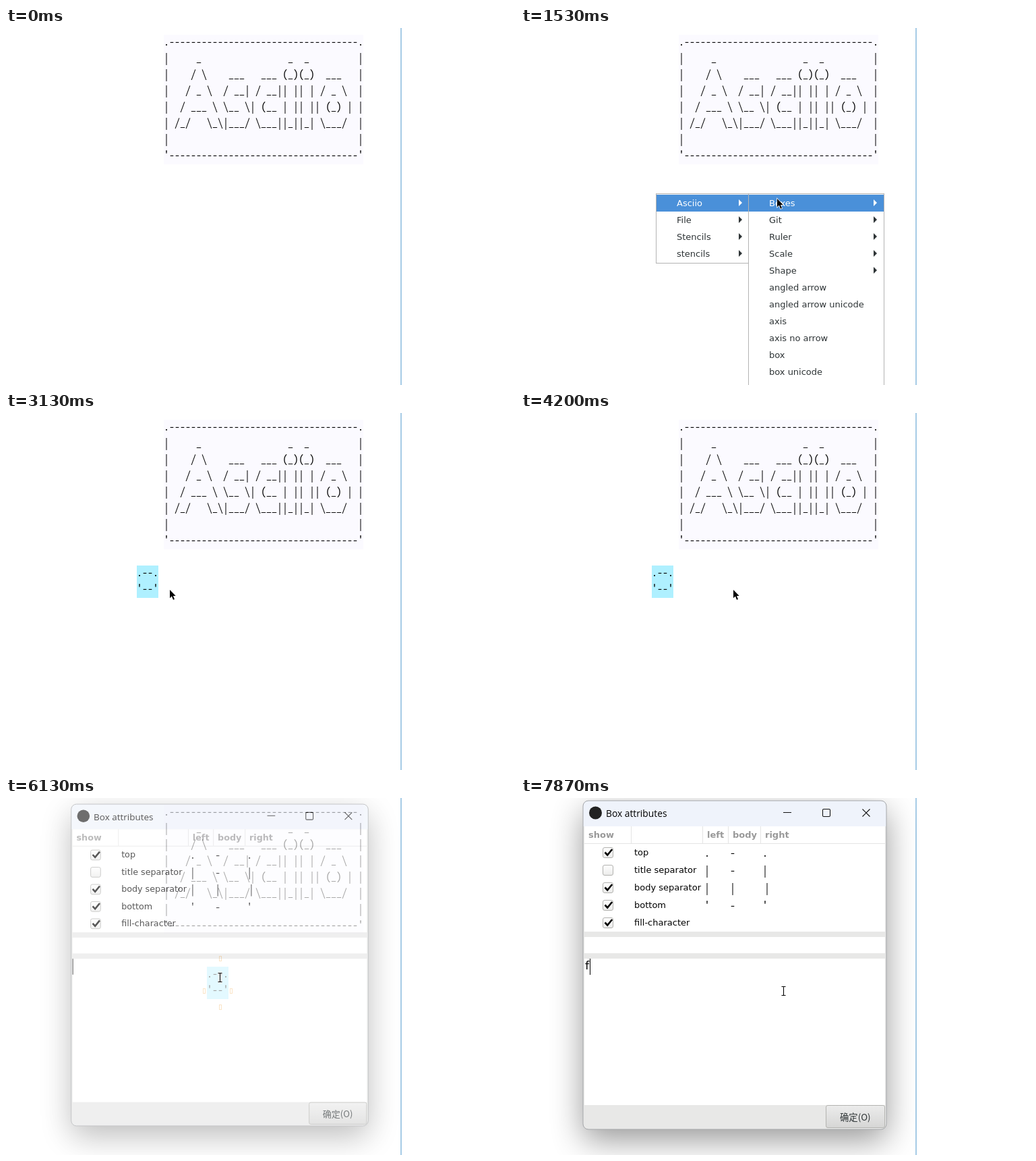
These frames come from a looping animation (755 px wide and 529 px high, 8 s). An HTML page:

```html
<!DOCTYPE html>
<html lang="en">
<head>
<meta charset="utf-8">
<title>Asciio box demo</title>
<style>
html, body { margin: 0; width: 100%; height: 100%; overflow: hidden; background: #fff; }
svg { display: block; width: 755px; height: 529px; }
text { white-space: pre; }
.ui { font: 13px "DejaVu Sans", sans-serif; }
.head { font: bold 13px "DejaVu Sans", sans-serif; fill: #999; }
.title { font: 13.8px "Open Sans", "Noto Sans", sans-serif; }
.cjk { font: 13.33px "Noto Sans CJK SC", "Noto Sans CJK JP", "Noto Sans CJK", sans-serif; fill: #2e3436; }
.mono { font: 16px "Noto Sans Mono CJK SC", "Noto Sans Mono CJK JP", "Noto Sans Mono", monospace; text-anchor: middle; }
.shadow { filter: blur(24px); }
</style>
</head>
<body>
<svg id="stage" viewBox="0 0 755 529">
  <defs>
    <linearGradient id="button" x2="0" y2="1"><stop stop-color="#ececec"/><stop offset="1" stop-color="#d6d6d5"/></linearGradient>
    <linearGradient id="check" x2="0" y2="1"><stop stop-color="#fff"/><stop offset="1" stop-color="#ebebea"/></linearGradient>
    <clipPath id="frame"><rect x="92" y="4" width="450" height="487" rx="8"/></clipPath>
  </defs>
</svg>
<script>
const stage = document.getElementById('stage');
const LOOP = 8000;

function add(parent, tag, attrs, content) {
  const el = document.createElementNS('http://www.w3.org/2000/svg', tag);
  for (const key in attrs) el.setAttribute(key, attrs[key]);
  if (content !== undefined) el.textContent = content;
  parent.appendChild(el);
  return el;
}
const group = parent => add(parent, 'g', {});
const rect = (p, x, y, width, height, fill, more) => add(p, 'rect', { x, y, width, height, fill, ...more });
const label = (p, x, y, cls, str) => add(p, 'text', { x, y, class: cls }, str);
const line = (p, d, stroke, width = 1) => add(p, 'path', { d, stroke, fill: 'none', 'stroke-width': width });
const show = (el, on) => el.setAttribute('visibility', on ? 'visible' : 'hidden');
const move = (el, x, y) => el.setAttribute('transform', `translate(${x} ${y})`);

// Text on a grid of 8 x 24 cells
function grid(p, x, y, rows) {
  rows.forEach((row, r) => [...row].forEach((ch, c) => {
    if (ch !== ' ') label(p, x + c * 8 + 4, y + r * 24 + 16, 'mono', ch);
  }));
}

// Canvas with banner
rect(stage, 585, 0, 2, 529, '#a6cbe6');
rect(stage, 234, 10, 296, 192, '#fbfaff');
const dashes = '-'.repeat(35);
grid(stage, 234, 10, [
  `.${dashes}.`,
  String.raw`|     _                _  _         |`,
  String.raw`|    / \    ___   ___ (_)(_)  ___   |`,
  String.raw`|   / _ \  / __| / __|| || | / _ \  |`,
  String.raw`|  / ___ \ \__ \| (__ | || || (_) | |`,
  String.raw`| /_/   \_\|___/ \___||_||_| \___/  |`,
  `|${' '.repeat(35)}|`,
  `'${dashes}'`
]);

// Selected element
const box = group(stage);
rect(box, 0, 0, 32, 48, '#aff0ff');
grid(box, 0, 0, ['.--.', "'--'"]);
const handles = group(box);
for (const [x, y] of [[20, -12], [-4, 36], [36, 36], [20, 60]])
  rect(handles, x - 1.5, y - 3.5, 3, 7, 'none', { stroke: '#f2b35e' });

// Menus
function menu(x, width, items, arrows) {
  const g = group(stage), height = items.length * 25 + 3;
  rect(g, x + .5, 245.5, width - 1, height, '#fff', { stroke: '#b3b3b3' });
  const bar = rect(g, x + 1, 247, width - 2, 25, '#4a90d9');
  const first = group(g);
  items.forEach((name, i) => {
    const row = i ? g : first, y = 247 + i * 25, tip = x + width - 11;
    add(row, 'text', { x: x + 31, y: y + 17, class: 'ui', ...(i && { fill: '#2e3436' }) }, name);
    if (i < arrows) add(row, 'path', { d: `M${tip - 5} ${y + 7}l5 5l-5 5z`, ...(i && { fill: '#2e3436' }) });
  });
  return (open, active) => {
    show(g, open);
    show(bar, open && active);
    first.setAttribute('fill', active ? '#fff' : '#2e3436');
  };
}
const mainMenu = menu(200, 139, ['Asciio', 'File', 'Stencils', 'stencils'], 4);
const subMenu = menu(337, 202, ['Boxes', 'Git', 'Ruler', 'Scale', 'Shape', 'angled arrow',
  'angled arrow unicode', 'axis', 'axis no arrow', 'box', 'box unicode', 'center connected box'], 5);
const execMenu = menu(537, 191, ['exec', 'exec add lines', 'exec no border', 'exec verbatim',
  'exec verbatim once', 'if', 'process'], 0);

// Dialog
const dialog = group(stage);
rect(dialog, 92, 20, 450, 487, '#000', { rx: 8, class: 'shadow', opacity: .4 });
const win = add(dialog, 'g', { 'clip-path': 'url(#frame)' });
rect(win, 92, 4, 450, 487, '#e8e8e7');
rect(win, 92, 4, 450, 38, '#eff3fb');
rect(win, 94, 42, 446, 156, '#fff');
rect(win, 94, 206, 446, 24, '#fff');
rect(win, 94, 238, 446, 217, '#fff');
add(win, 'circle', { cx: 110.5, cy: 22, r: 9.5, fill: '#222' });
label(win, 126, 28, 'title', 'Box attributes');
line(win, 'M389 21.5h12M506.5 16.5l11 11m0-11l-11 11', '#111', 1.1);
rect(win, 447.5, 16.5, 11, 11, 'none', { rx: 1.5, stroke: '#111', 'stroke-width': 1.1 });
line(win, 'M94 67.5h446M163.5 42v25M269.5 42v25M307.5 42v25M355.5 42v25', '#e4e4e4');
for (const [x, name] of [[100, 'show'], [276, 'left'], [314, 'body'], [362, 'right']])
  label(win, x, 59, 'head', name);

[['top', 1, '.-.'], ['title separator', 0, '|-|'], ['body separator', 1, '|||'],
 ['bottom', 1, "'-'"], ['fill-character', 1, '']].forEach(([name, on, chars], i) => {
  const y = 81 + i * 26;
  rect(win, 121.5, y - 7.5, 15, 15, 'url(#check)', { rx: 2.5, stroke: '#b2b2af' });
  if (on) line(win, `M124.5 ${y - .5}l3.7 4l7-8.5`, '#000', 2.6);
  label(win, 168, y + 4, 'ui', name);
  [...chars].forEach((ch, c) => label(win, [276, 314, i === 2 ? 365 : 362][c], y + 6, 'mono', ch));
});
rect(win, 452.5, 455.5, 87, 33, 'url(#button)', { rx: 2.5, stroke: '#b3b3b0' });
label(win, 473, 478, 'cjk', '确定(O)');
const typed = label(win, 98, 254, 'mono', 'f');
const caret = rect(win, 0, 238, 1, 24, '#000');
rect(dialog, 92, 4, 450, 487, 'none', { rx: 8, stroke: '#a5a7aa' });

// Pointers
const arrow = add(stage, 'path', {
  d: 'M0 0V12.3L2.9 9.6L5 14.8L7 14L4.9 9H8.7Z',
  stroke: '#fff', 'stroke-width': 1.4, 'paint-order': 'stroke'
});
const beam = group(stage);
const beamPath = 'M-3 -6.5h2.5l.5 .5l.5 -.5h2.5M-3 6.5h2.5l.5 -.5l.5 .5h2.5M0 -6v12';
line(beam, beamPath, '#fff', 2.4);
line(beam, beamPath, '#000', 1.1);

// Pointer path: time, x, y
const path = [
  [70, 571, 124], [470, 197, 246], [600, 197, 246], [670, 196, 244], [730, 196, 243],
  [800, 196, 243], [1000, 212, 254], [1270, 300, 258], [1530, 380, 253], [1730, 380, 253],
  [2530, 589, 258], [2600, 589, 258], [3200, 238, 262], [3330, 238, 262], [3600, 212, 250],
  [3730, 212, 250], [4070, 330, 264], [4200, 315, 262], [4270, 315, 262], [4600, 219, 228],
  [4730, 219, 228], [5330, 323, 252], [5530, 323, 252], [5600, 317, 265], [6330, 317, 265],
  [6870, 389, 285], [LOOP, 389, 285]
];
function pointer(t) {
  const i = Math.max(1, path.findIndex(p => p[0] >= t));
  const [t0, x0, y0] = path[i - 1], [t1, x1, y1] = path[i];
  const u = Math.min(1, Math.max(0, (t - t0) / (t1 - t0)));
  const e = 1 - (1 - u) ** 2;
  return [Math.round(x0 + (x1 - x0) * e), Math.round(y0 + (y1 - y0) * e)];
}

function step(t) {
  const at = k => Math.round(k * 20 / 3) * 10;
  const k = Math.floor((t + 4) * .015);
  return at(k) > t ? at(k - 1) : at(k);
}

function draw(ms) {
  const t = step(ms), [x, y] = pointer(t);
  const within = (from, to) => t >= from && t < to;

  mainMenu(within(870, 2600), t >= 1000);
  subMenu(within(1270, 2600), x > 337);
  execMenu(within(1800, 2600), x > 537);

  const drag = Math.min(t, 5330), [dx, dy] = drag > 4730 ? pointer(drag) : [219, 228];
  const bx = 194 + 8 * Math.round((dx - 219) / 8);
  const by = 226 + 24 * Math.round((dy - 228) / 24);
  const placed = t >= 2670;
  show(box, placed);
  move(box, bx, by);
  show(handles, placed && x >= bx && x < bx + 32 && y >= by && y < by + 48);

  const open = t >= 6070, grow = Math.min(1, (t - 6000) / 200);
  dialog.setAttribute('display', open ? 'inline' : 'none');
  if (open) {
    const s = .94 + .06 * grow;
    dialog.setAttribute('opacity', grow);
    dialog.setAttribute('transform', `translate(317 247.5) scale(${s}) translate(-317 -247.5)`);
  }
  const wrote = t >= 7870;
  show(typed, wrote);
  show(caret, !within(7730, 7870));
  caret.setAttribute('x', wrote ? 102 : 94);

  show(arrow, t >= 70 && !open);
  show(beam, open);
  move(arrow, x, y);
  move(beam, x + .5, y + 1);
}

const start = performance.now();
function tick() {
  draw((performance.now() - start) % LOOP);
  requestAnimationFrame(tick);
}
tick();
</script>
</body>
</html>
```
